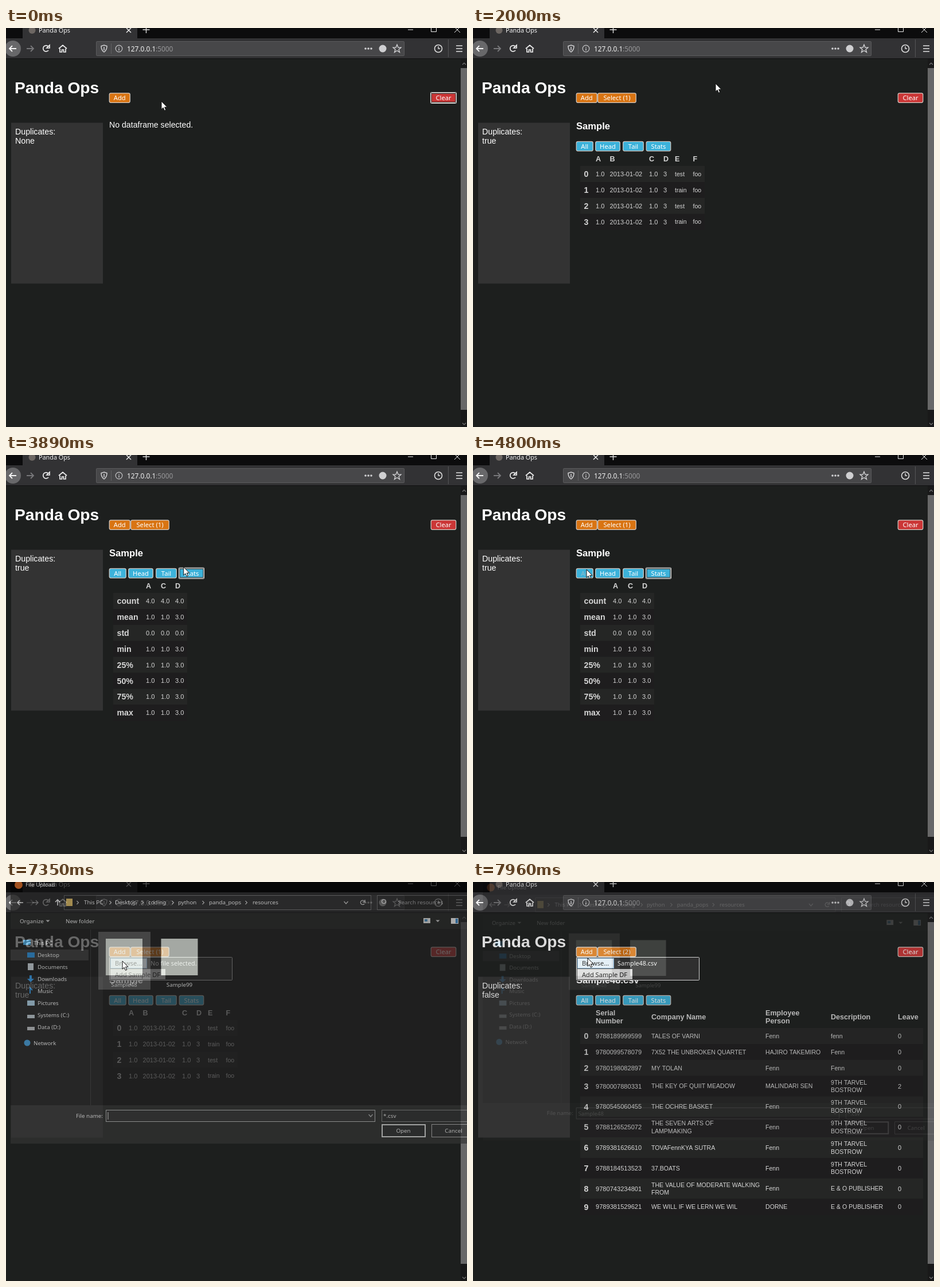
An HTML page with a canvas that plays this animation: 804 px wide and 697 px high, repeating every 8000 ms.

```html
<!DOCTYPE html>
<html lang="en">
<head>
<meta charset="utf-8">
<title>Panda Ops</title>
<style>
  html, body { margin: 0; width: 100%; height: 100%; overflow: hidden; background: #1d1f1e; }
  canvas { display: block; }
</style>
</head>
<body>
<canvas id="stage" width="804" height="697"></canvas>
<script>
const LOOP = 8000, W = 804, H = 697;
const screen2d = document.getElementById('stage').getContext('2d');
const layer = document.createElement('canvas');
layer.width = W;
layer.height = H;
const layer2d = layer.getContext('2d');
let g = screen2d;

const ARIAL = '"Liberation Sans", Arial, sans-serif';
const UI = '"Noto Sans", "Open Sans", sans-serif';
const ORANGE = '#d97412', BLUE = '#3cb2da', RED = '#cb3636', PALE = '#d6d6d6';

// Pointer path: time, x, y of the tip
const POINTER = [
  [0, 271, 128], [190, 271, 128], [300, 240, 108], [470, 204, 119], [780, 230, 153],
  [1100, 230, 153], [1490, 260, 150], [1640, 260, 150], [2000, 423, 97], [2420, 291, 118],
  [2530, 272, 118], [2960, 272, 118], [3000, 275, 114], [3190, 275, 114], [3620, 326, 202],
  [3770, 326, 202], [4150, 258, 176], [4560, 200, 200], [4760, 200, 200], [4800, 198, 200],
  [5780, 198, 200], [6180, 199, 118], [6300, 198, 123], [6670, 198, 123], [6880, 203, 138],
  [7600, 203, 138], [7880, 200, 133], [8000, 200, 133]
];

const SAMPLE = {
  title: 'Sample', top: 241, right: 404, xs: [214, 238.5, 307, 332, 352, 383.5],
  heads: ['A', 'B', 'C', 'D', 'E', 'F'],
  rows: [0, 1, 2, 3].map(i => [i, '1.0', '2013-01-02', '1.0', '3', i % 2 ? 'train' : 'test', 'foo'])
};
const STATS = {
  title: 'Sample', top: 241, right: 316, xs: [244, 270, 295],
  heads: ['A', 'C', 'D'],
  rows: ['count', 'mean', 'std', 'min', '25%', '50%', '75%', 'max'].map(name =>
    name === 'count' ? [name, '4.0', '4.0', '4.0']
      : name === 'std' ? [name, '0.0', '0.0', '0.0'] : [name, '1.0', '1.0', '3.0'])
};
const PRESS = '9TH TARVEL\nBOSTROW', HOUSE = 'E & O PUBLISHER';
const BOOKS = {
  title: 'Sample48.csv', top: 255, right: 785, xs: [214, 311, 510, 624, 741],
  heads: ['Serial\nNumber', 'Company Name', 'Employee\nPerson', 'Description', 'Leave'],
  rows: [
    ['9788189999599', 'TALES OF VARNI', 'Fenn', 'fenn', '0'],
    ['9780099578079', '7X52 THE UNBROKEN QUARTET', 'HAJIRO TAKEMIRO', 'Fenn', '0'],
    ['9780198082897', 'MY TOLAN', 'Fenn', 'Fenn', '0'],
    ['9780007880331', 'THE KEY OF QUIIT MEADOW', 'MALINDARI SEN', PRESS, '2'],
    ['9780545060455', 'THE OCHRE BASKET', 'Fenn', PRESS, '0'],
    ['9788126525072', 'THE SEVEN ARTS OF\nLAMPMAKING', 'Fenn', PRESS, '0'],
    ['9789381626610', 'TOVAFennKYA SUTRA', 'Fenn', PRESS, '0'],
    ['9788184513523', '37.BOATS', 'Fenn', PRESS, '0'],
    ['9780743234801', 'THE VALUE OF MODERATE WALKING\nFROM', 'Fenn', HOUSE, '0'],
    ['9789381529621', 'WE WILL IF WE LERN WE WIL', 'DORNE', HOUSE, '0']
  ].map((row, i) => [i, ...row])
};

const clamp = v => Math.max(0, Math.min(1, v));

function rect(x, y, w, h, fill, stroke, radius = 0, width = 1) {
  g.beginPath();
  g.roundRect(x, y, w, h, radius);
  if (fill) { g.fillStyle = fill; g.fill(); }
  if (stroke) { g.strokeStyle = stroke; g.lineWidth = width; g.stroke(); }
}
function disc(x, y, r, fill, stroke, width = 1.5) {
  rect(x - r, y - r, 2 * r, 2 * r, fill, stroke, r, width);
}
function path(d, x, y, stroke, width = 1, fill) {
  const shape = new Path2D(d);
  g.save();
  g.translate(x, y);
  if (fill) { g.fillStyle = fill; g.fill(shape); }
  if (stroke) { g.strokeStyle = stroke; g.lineWidth = width; g.stroke(shape); }
  g.restore();
}
function text(s, x, y, size, color = '#fff', family = UI, weight = 400, align = 'left') {
  g.font = `${weight} ${size}px ${family}`;
  g.fillStyle = color;
  g.textAlign = align;
  g.fillText(s, x, y);
}
function lines(s, x, middle, size, gap, weight) {
  const parts = String(s).split('\n');
  parts.forEach((part, i) =>
    text(part, x, middle + (i - (parts.length - 1) / 2) * gap + size * .36, size, PALE, ARIAL, weight));
}

function pointerAt(t) {
  const i = POINTER.findIndex(k => k[0] > t);
  const [t0, x0, y0] = POINTER[i - 1], [t1, x1, y1] = POINTER[i];
  const p = (t - t0) / (t1 - t0), e = p * p * (3 - 2 * p);
  return [x0 + (x1 - x0) * e, y0 + (y1 - y0) * e];
}

function button(label, x, y, w, fill, [px, py], focused) {
  const hover = px >= x && px < x + w && py >= y && py < y + 18;
  rect(x + .75, y + .75, w - 1.5, 16.5, fill, '#d2cac4', 2.5, 1.25);
  if (focused) {
    rect(x + 1.5, y + 1.5, w - 3, 15, null, '#333', 1);
    rect(x, y - .5, w, 19, null, '#e4e4e4', 1);
  }
  text(label, x + w / 2, y + 13.2, 11.2, hover ? 'rgba(190,190,190,.65)' : '#fff', UI, 400, 'center');
}

function drawBrowser() {
  rect(0, 0, W, 18, '#0c0c0d');
  rect(29, 0, 200, 18, '#323234');
  rect(0, 18, W, 35, '#323234');
  rect(0, 53, W, 1, '#101011');
  disc(45.5, 4, 6, '#6d6763');
  text('Panda Ops', 57, 8, 10.8, '#f4f4f4');
  path('M-4-4L4 4M4-4L-4 4', 214, 4, '#eee', 1.4);
  path('M-6 0H6M0-6V6', 244.5, 3, '#ddd', 1.4);
  path('M0 0H9', 701, 3, '#eee');
  rect(741.5, -2.5, 9, 9, null, '#eee');
  path('M-5-5L5 5M5-5L-5 5', 787, 3, '#eee');

  disc(12, 36, 14, '#68686a');
  path('M6 0H-6M-1-5L-6 0L-1 5', 12, 36, '#f4f4f4', 1.8);
  path('M-6 0H6M1-5L6 0L1 5', 42, 36, '#77777a', 1.8);
  path('M4 3A5.2 5.2 0 1 1 4-3.5M6-6V-1H1Z', 70, 36, '#eee', 1.7);
  path('M-7 0L0-6L7 0M-5 0V6H-1.5V2H1.5V6H5V0', 99, 36, '#eee', 1.7);

  rect(157.5, 23.5, 537, 25, '#474749', '#5b5b5d', 1);
  path('M0-6L5-4.5C5 1 3 4 0 6C-3 4-5 1-5-4.5ZM0-3V3', 171, 36, '#d0d0d2', 1.5);
  rect(183, 27, 1, 18, '#626264');
  disc(197, 36, 5.8, null, '#c4c4c6', 1.2);
  path('M0-3V-1.7M0-.5V3.5', 197, 36, '#c4c4c6', 1.4);
  text('127.0.0.1', 211, 41, 11.9, '#f2f2f2');
  text(':5000', 261, 41, 11.9, '#98989a');
  for (const x of [627, 632, 637]) disc(x, 36, 1.8, '#d0d0d2');
  disc(657, 36, 6.5, '#cfcfd1');
  path('M0-7L2-2L7-1.8L3 1.5L4.5 6.5L0 3.5L-4.5 6.5L-3 1.5L-7-1.8L-2-2Z', 682, 36, '#d8d8da', 1.3);
  disc(754, 36, 6.5, null, '#ddd', 1.6);
  path('M0-4V0H3', 754, 36, '#ddd', 1.4);
  rect(771, 20, 1, 31, '#555557');
  path('M0 0H11M0 5H11M0 10H11', 785, 31, '#e4e4e4', 1.6);

  rect(793, 54, 11, 643, '#191919');
  rect(793, 70, 11, 597, '#686868');
  path('M-3 2L0-1L3 2', 799, 62, '#777', 1.2);
  path('M-3-2L0 1L3-2', 799, 692, '#777', 1.2);
}

function drawTable({ top, right, xs, heads, rows }) {
  heads.forEach((head, i) => lines(head, xs[i], (215 + top) / 2, 12.6, 14, 700));
  let y = top;
  rows.forEach(([label, ...cells], i) => {
    const height = cells.some(c => c.includes('\n')) ? 35.8 : 27.9;
    rect(187, y, right - 187, height, i % 2 ? '#1e1d1e' : '#252625');
    lines(label, 193.5, y + height / 2, 14.2, 14, 700);
    cells.forEach((cell, c) =>
      lines(cell, xs[c], y + height / 2, /^[\d.-]+$/.test(cell) ? 11.1 : 10.6, 13.5, 400));
    y += height;
  });
}

function drawPage(t, at) {
  const table = t < 930 ? null : t < 3770 ? SAMPLE : t < 5230 ? STATS : t < 7900 ? SAMPLE : BOOKS;
  rect(0, 54, 793, 643, '#1d1f1e');
  text('Panda Ops', 15, 114, 28.2, '#fff', ARIAL, 700);
  rect(9, 165.5, 160, 281, '#333333');
  text('Duplicates:', 16, 186, 14.2, '#fff', ARIAL);
  text(!table ? 'None' : String(table !== BOOKS), 16, 202, 14.2, '#fff', ARIAL);

  button('Add', 179.5, 113, 37.5, ORANGE, at);
  if (table) button(`Select (${table === BOOKS ? 2 : 1})`, 217, 113, 68, ORANGE, at);
  button('Clear', 740.5, 113, 45, RED, at, t < 700);

  if (table) {
    text(table.title, 180, 177, 16.6, '#fff', ARIAL, 700);
    button('All', 179.5, 197.5, 30.5, BLUE, at, t >= 5230 && t < 6880);
    button('Head', 213, 197.5, 44, BLUE, at);
    button('Tail', 261, 197.5, 37, BLUE, at);
    button('Stats', 301.5, 197.5, 44, BLUE, at, table === STATS);
    drawTable(table);
  } else {
    text('No dataframe selected.', 180, 174, 14.15, '#fff', ARIAL);
  }

  if ((t >= 420 && t < 1790) || t >= 6130) {
    rect(180.5, 131.5, 214, 40, '#333', '#f4f4f4', 1);
    rect(182, 133, 64, 18, t >= 6880 ? '#e5f1fb' : '#e1e1e1');
    if (t >= 6880) rect(182.5, 133.5, 63, 17, null, '#7cb0dc');
    rect(182, 152, 96, 18, '#e1e1e1');
    text('Browse...', 190, 146, 11.1, '#111');
    text(table === BOOKS ? 'Sample48.csv' : 'No file selected.', 252, 146, 10.8);
    text('Add Sample DF', 190, 165.5, 11.1, '#111');
  }
  if (t >= 2480 && t < 3300) {
    rect(217.5, 131.5, 47, 22, '#2e2e2e', '#f4f4f4', 1);
    text('Sample', 222, 147, 11);
  }
}

function drawDialog(t) {
  const label = (s, x, y, color = '#f0f0f0', align) => text(s, x, y, 9.8, color, UI, 400, align);
  const chosen = t >= 7510;
  rect(8, -20, 844, 477, '#202020');
  rect(8, -20, 844, 38, '#050505');
  rect(8, 54, 844, 28, '#282828');
  rect(8, 390, 844, 67, '#343434');
  rect(147, 83, 1, 307, '#3c3c3c');
  disc(22, 5, 7, '#e8742a');
  label('File Upload', 34, 8.5, '#fff');

  path('M5 0H-5M-1-4L-5 0L-1 4', 25, 36, '#eee', 1.4);
  path('M-5 0H5M1-4L5 0L1 4', 51, 36, '#888', 1.4);
  path('M0 5V-5M-4-1L0-5L4-1', 90, 36, '#eee', 1.6);
  rect(101.5, 23.5, 535, 25, '#1c1c1c', '#5c5c5c');
  rect(105, 29, 11, 13, '#d8b65c');
  for (const x of [125, 182, 238, 291, 344, 419]) path('M-1.5-3L1.5 0L-1.5 3', x, 36, '#ccc', 1.1);
  [['This PC', 136], ['Desktop', 190], ['coding', 248], ['python', 300], ['panda_pops', 354], ['resources', 430]]
    .forEach(([s, x]) => label(s, x, 39.5));
  path('M-3.5-2L0 2L3.5-2', 593, 36, '#bbb', 1.3);
  path('M3 2A3.7 3.7 0 1 1 3-2.5M4-5V-1H0', 622, 36, '#bbb', 1.3);
  rect(647.5, 23.5, 190, 25, '#1c1c1c', '#5c5c5c');
  disc(659, 34, 3.5, null, '#aaa', 1.2);
  label('Search resources', 684, 39.5, '#999');

  label('Organize', 24, 72);
  label('New folder', 104, 72);
  path('M-3.5-1.5H3.5L0 2Z', 73, 68, null, 1, '#ccc');
  path('M-3.5-1.5H3.5L0 2Z', 753, 68, null, 1, '#ccc');
  rect(728, 63, 12, 9, '#ddd');
  rect(730, 65, 5, 4, '#4b88b8');
  rect(776, 63, 13, 10, '#eee');
  rect(784, 64, 4, 8, '#3a86c8');

  rect(8, 118, 136, 19, '#3c3c3c');
  rect(30, 101, 13, 9, '#4aa6dd');
  label('This PC', 48, 110);
  const places = [['Desktop', '#2f8fd8'], ['Documents', '#c8d2d8'], ['Downloads', '#2f94e0'], ['Music', '#2f94e0'],
    ['Pictures', '#a8cbe0'], ['Systems (C:)', '#b8c4cc'], ['Data (D:)', '#b8bcc0']];
  places.forEach(([name, color], i) => {
    const y = 131 + 21 * i;
    if (name === 'Downloads') path('M-2-6H2V0H6L0 6L-6 0H-2Z', 43, y - 4, null, 1, color);
    else if (name === 'Music') path('M0 4V-6L4-2', 42, y - 3, color, 2);
    else if (name === 'Documents') rect(38, y - 10, 10, 12, color);
    else rect(37, y - (i > 4 ? 4 : 8), 13, i > 4 ? 6 : 9, color);
    label(name, 55, y);
  });
  disc(37, 281, 5.5, '#3f9bd8');
  label('Network', 48, 285);

  rect(161, 87, 91, 101, chosen ? '#777' : '#585858');
  for (const [name, x] of [['Sample48', 206], ['Sample99', 302.5]]) {
    rect(x - 32, 99, 64, 64, '#e4eae2');
    label(name, x, 183.5, '#f2f2f2', 'center');
  }

  label('File name:', 169, 411.5, '#f0f0f0', 'right');
  rect(174.5, 398.5, 469, 20, '#383838', '#c0c0c0');
  if (chosen) label('Sample48', 178, 412);
  else rect(177.5, 402, 1, 13, '#eee');
  path('M-3.5-2L0 2L3.5-2', 636, 408, '#bbb', 1.2);
  rect(655.5, 398.5, 160, 20, '#333', '#8a8a8a');
  label('*.csv', 658, 412);
  rect(656, 424, 75, 21, '#333', '#e0e0e0', 0, 2);
  label('Open', 693, 438, '#f0f0f0', 'center');
  rect(742.5, 423.5, 76, 22, '#333', '#b8b8b8');
  label('Cancel', 780.5, 438, '#f0f0f0', 'center');
}

// The dialog fades and scales about its own centre when opening and closing.
function compositeDialog(t) {
  if (t < 7250) return;
  const opening = clamp((t - 7250) / 200), closing = clamp((t - 7800) / 200);
  const scale = 1.015 * (1 - .06 * (1 - opening) ** 2) * (1 - .0455 * closing);
  const cx = 430, cy = 210;
  g = layer2d;
  g.setTransform(1, 0, 0, 1, 0, 0);
  g.clearRect(0, 0, W, H);
  g.setTransform(scale, 0, 0, scale, cx * (1 - scale), cy * (1 - scale));
  drawDialog(t);
  g = screen2d;
  g.globalAlpha = Math.min(1, opening * 1.34) * (1 - closing) ** 1.1;
  g.drawImage(layer, 0, 0);
  g.globalAlpha = 1;
}

function render(t) {
  const at = pointerAt(t);
  drawPage(t, at);
  drawBrowser();
  compositeDialog(t);
  path('M0 0V14.2L3.2 11.2L5.4 16.3L7.8 15.3L5.6 10.3H10Z', ...at, '#111', 1, '#fff');
}

const start = performance.now();
function tick() {
  render((performance.now() - start) % LOOP);
  requestAnimationFrame(tick);
}
tick();
</script>
</body>
</html>
```
